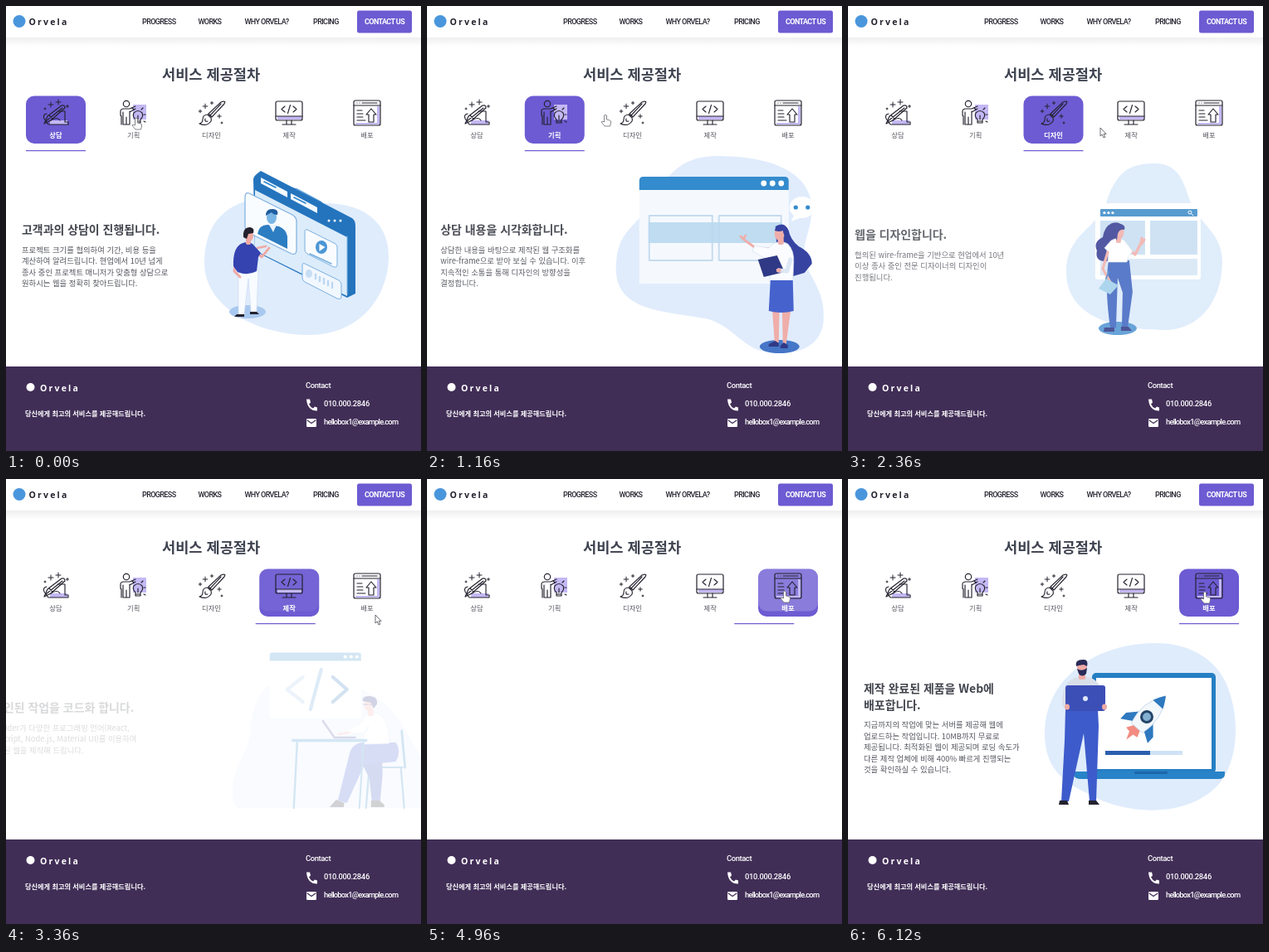
Write an HTML page that moves like this. It is 500 by 537 pixels and loops after 6.16 s.

```html
<!DOCTYPE html>
<html lang="ko">
<head>
<meta charset="utf-8">
<style>
html, body { margin: 0; width: 100%; height: 100%; overflow: hidden; background: #fff; }
svg { display: block; width: 100vw; height: 100vh; }
text { font-family: "Noto Sans CJK KR", "Noto Sans CJK", sans-serif; }
.nav { font: 500 9px Roboto, sans-serif; letter-spacing: -.6px; }
.brand { font: 600 10.5px "Noto Sans", sans-serif; letter-spacing: 2.2px; }
.info { font: 500 9.4px Roboto, sans-serif; fill: #fff; }
</style>
</head>
<body>
<svg id="stage" viewBox="0 0 500 537" preserveAspectRatio="none"></svg>
<script>
const LOOP = 6160, GAP = 93.75, PURPLE = '#6c5bd2', INK = '#24222e', LILAC = '#c4b8f4', GREY = '#55575f';
const SKIN = '#efaaa5', NAVY = '#26307f', ROYAL = '#3d5bcb', SKY = '#2b86cb', PALE = '#dfecfc';
const CLICKS = [0, 621, 1942, 3142, 4828];

// Shape helpers
const path = (d, fill, more = '') => `<path d="${d}" fill="${fill}" ${more}/>`;
const line = (d, color = INK, w = 1.15) =>
  `<path d="${d}" fill="none" stroke="${color}" stroke-width="${w}" stroke-linecap="round" stroke-linejoin="round"/>`;
const rect = (x, y, w, h, fill, r = 0, more = '') =>
  `<rect x="${x}" y="${y}" width="${w}" height="${h}" rx="${r}" fill="${fill}" ${more}/>`;
const oval = (x, y, rx, ry, fill, more = '') =>
  `<ellipse cx="${x}" cy="${y}" rx="${rx}" ry="${ry}" fill="${fill}" ${more}/>`;
const dots = (xs, y, r, fill) => xs.map(x => oval(x, y, r, r, fill)).join('');
const text = (x, y, s, size, fill, more = '') =>
  `<text x="${x}" y="${y}" font-size="${size}" fill="${fill}" ${more}>${s}</text>`;
const label = (x, y, s, cls, more = '') => `<text class="${cls}" x="${x}" y="${y}" ${more}>${s}</text>`;
const plus = (x, y, r) => line(`M${x - r} ${y}h${2 * r}M${x} ${y - r}v${2 * r}`, INK, 1);
const stroke = (color, w) => `stroke="${color}" stroke-width="${w}" stroke-linejoin="round"`;

const tabs = [
  { name: '상담', icon:
    rect(53, 138, 21, 5, LILAC) +
    line('M49 130q-5 1-3 6l5 7h24v-3h-4V127h-9M53 143h22') +
    path('M46 142l4-9 17-13q4-1 4 3L54 138z', 'none', stroke(INK, 1.2)) +
    line('M48 139l20-16M54 138q8-5 11 0M52 132l4 4') +
    plus(54, 119, 3) + plus(63, 116, 3) + plus(74, 121, 1.5) + plus(47, 124, 1) },
  { name: '기획', icon:
    rect(153, 119, 16, 18, LILAC) + oval(145, 118, 3.7, 3.7, 'none', stroke(INK, 1.15)) +
    line('M139 143v-10l-1-1v-5q0-3 4-3h7l7-3M141 128v15h4v-9M149 127v16h-4M149 128l7-4') +
    line('M156 137q-4-4-2-8 5-5 10 0 2 4-2 8v4h-6zM156 139h6M159 137v-5M152 123l2 2M165 123l-2 2M168 131h-2M166 139l2 1') },
  { name: '디자인', icon:
    line('M262 115q3 0 1 3l-15 16-4-4 15-14zM244 130l4 4M243 131q-6 0-6 6 0 4-4 5 9 4 14-3 1-4-1-5z') +
    line('M240 136q-1 4 3 3M246 132l13-14') +
    plus(240, 121, 2.8) + plus(248, 117, 1.7) + plus(234, 127, 1.8) + plus(257, 133, 2.2) + plus(260, 141, 1) },
  { name: '제작', icon:
    rect(327, 133, 29, 4, LILAC) + rect(325, 115, 32, 23, 'none', 2, stroke(INK, 1.2)) +
    line('M325 133h32M338 138v5M344 138v5M333 143h16M336 121l-4 3.5 4 3.5M346 121l4 3.5-4 3.5M342.5 119.5l-3 10') },
  { name: '배포', icon:
    rect(421, 141, 29, 2, LILAC) + rect(447, 121, 3, 20, LILAC) + rect(419, 114, 32, 30, 'none', 2, stroke(INK, 1.2)) +
    line('M419 120h32M423 117h.1M426 117h.1M429 117h18M423 126h6M423 130h7M423 134h7M423 138h10') +
    line('M440 124l6 7h-3v9h-6v-9h-3z') }
];

const consult = path('M239 310C239 265 262 240 300 233C340 227 352 233 385 238C432 238 461 262 461 302C461 352 425 397 365 397C300 397 239 362 239 310', PALE) +
  path('M342 232v-8q2-6 9-3l28 15q5 4 5 14l-6 5z', '#d5e8f8', stroke('#4f9ad6', 1.2)) +
  path('M298 209q0-4 9-10l110 57q4 3 4 9v82l-10 5-111-56z', '#2474bd') +
  path('M300 222l111 57v71l-111-55z', '#dcecfa') +
  path('M307 207l32 17v7l-32-17zM343 226l32 17v7l-32-17z', '#f4faff') +
  line('M311 212l14 7M347 231l14 7', SKY, 1.6) + dots([389, 396, 403], 259, 1.5, '#fff') +
  line('M411 278v70', '#84b8e4', 1) +
  path('M293 226l52 26q5 3 5 8v34q0 7-6 5l-51-25q-5-3-5-8v-35q0-7 5-5z', '#f9fcff', stroke('#7fb0e0', 1.2)) +
  path('M303 275q2-11 12-11l14 2q8 3 10 12v15z', '#2d7dc2') + oval(320, 255, 6, 8, '#79b6e4') +
  path('M313 253q0-9 9-8 7 1 5 7-5 0-7-3z', '#1f5d9f') + path('M317 264l5 9 4-9z', '#e9f5ff') +
  path('M363 270l34 17q2 1 2 4v21q0 4-4 3l-32-16q-3-2-3-5v-21q0-4 3-3z', '#f9fcff', stroke('#79afe0', 1)) +
  oval(380, 291, 7, 8, '#4b96d6') + path('M377.5 287l7 4-7 5z', '#fff') + line('M366 299l26 12', '#75aee0', 1.4) +
  path('M360 311l41 20q3 2 3 5v14q0 5-5 3l-39-20q-3-2-3-5v-14q0-5 3-3z', '#f1f7fe', stroke('#79afe0', 1)) +
  oval(365, 323, 4, 5, '#c6def4') + line('M373 324v5M378 327v5M383 329v6M388 332v5M393 334v6', '#bcd7f0', 2.4) +
  oval(291, 369, 22, 8, '#a9c8ef') +
  path('M280 318h24l-2 51h-7l-3-40-5 43h-7z', '#f8fbff', stroke('#c6d7ee', .6)) +
  path('M278 372h9v3h-12zM294 369h8l3 3h-11z', INK) +
  line('M301 296l7 7 9-11M303 292l10-2', SKIN, 2.8) + line('M278 302l-3 18 7 7', SKIN, 3) +
  path('M283 287q8-4 14 0l10 11-3 5-2 17q-11 6-23 1l-5-7q-1-21 9-27z', '#3443b0') + rect(289, 280, 6, 8, SKIN, 2) +
  oval(293, 277, 5, 7, SKIN) + path('M286 279q-1-12 8-12 6 1 4 7l-6 1-2 6z', INK);

const plan = path('M228 320C228 270 250 270 268 240C290 200 310 181 350 181C405 181 455 195 463 235C468 265 450 285 455 310C468 335 480 350 478 380C475 410 450 420 420 419C380 417 375 390 340 378C290 368 230 370 228 320', PALE) +
  rect(256, 214, 180, 121, '#f5f9fe') + path('M256 222v-11q0-5 5-5h170q5 0 5 5v11z', SKY) + dots([406, 416.5, 427], 214, 3.4, '#fff') +
  rect(268, 253, 76, 54, 'none', 0, stroke('#c5dbee', 2)) +
  rect(352, 253, 75, 54, 'none', 0, stroke('#c5dbee', 2)) +
  rect(267, 261, 161, 25, '#b6d9f0', 0, 'opacity=".9"') +
  oval(452, 243, 15, 13, '#fff') + path('M443 251l-4 9 13-5z', '#fff') + dots([444.5, 459], 243, 2.6, SKY) +
  oval(425, 411, 24, 8, '#3d70c5') +
  path('M416 363h9l-1 43h-5zM428 363h11l-6 45h-4z', SKIN) + path('M412 408l8-4 4 3v4h-12zM426 410l4-4 5 3v4h-9z', NAVY) +
  path('M420 266q11-7 16 5 2 11 12 19 16 8 16 21l-9 11-17 5-16-30z', '#2d3a9d') +
  line('M414 293l-18-1-15-11M381 281l-3-3M382 280l2-3', SKIN, 2.8) +
  path('M417 287q10-5 18 0 8 8 7 23l-1 23h-28l1-25-22-12 3-7 17 3z', '#fafcff', stroke('#cddbec', .6)) +
  rect(423, 279, 7, 9, SKIN, 2) + oval(425, 275, 6, 8, SKIN) + path('M419 271q2-8 11-7 7 6 5 18-5-4-6-11-4 2-10 0z', '#2d3a9d') +
  path('M414 331h27l1 37q-15 4-30 0z', ROYAL) + path('M399 306l23-5 9 20-25 6z', NAVY) + line('M438 306l-4 14-10-1', '#dce7f5', 5) + oval(424, 319, 3, 2.4, SKIN);

const design = path('M263 320C263 275 300 270 312 235C325 195 345 190 370 190C400 190 405 215 412 235C425 265 452 275 451 310C450 360 420 392 380 391C320 390 263 375 263 320', '#d9e9fb') +
  rect(298, 238, 127, 92, '#fff', 3) + rect(304, 245, 117, 9, '#3185c6', 1) + dots([309, 314, 319], 249.5, 1.6, '#fff') +
  oval(412, 249, 2, 2, 'none', 'stroke="#fff"') + line('M414 251l2 2', '#fff', 1) +
  rect(304, 259, 54, 41, '#c4dcf2') + rect(364, 259, 57, 41, '#c4dcf2') + rect(304, 305, 117, 20, '#d3e5f6') +
  oval(325, 389, 23, 8, '#478fd0') +
  path('M314 307h25l4 38-6 43h-7l1-42-6-18-2 60h-7q-7-48-2-81z', '#355ebd') + path('M309 388h12v5h-13zM329 387h9l4 5h-13z', NAVY) +
  path('M318 262q12-3 14 8l-9 17q0 18-11 21-15 1-12-13-5-10 7-16 2-13 11-17z', '#2c348d') +
  line('M337 292l9 8 7-14M353 287l1-7M354 287l3-5', SKIN, 3.2) +
  path('M317 283q8-5 16 0l10 13-5 6-2 7h-23q2-14-4-17z', '#fff', stroke('#d4deec', .6)) +
  line('M313 297l-6 20 10 18', SKIN, 3.2) + rect(323, 278, 6, 8, SKIN, 2) + oval(327, 273, 5.5, 8, SKIN) +
  path('M320 274q-2-13 9-11 6 2 4 7-6-1-8 5l-1 8z', '#2c348d') +
  path('M311 329l15 8-10 11-14-7z', '#9bcce9') + line('M311 329l3-8', '#4b85c7', 2);

const build = path('M225 375C228 340 243 335 247 302C250 265 262 242 300 240L365 250C405 258 425 285 438 312C452 336 462 342 469 362C480 385 476 397 468 397H234Q225 397 225 375', PALE) +
  rect(270, 211, 110, 78, '#fff', 2) + path('M270 219.5v-7q0-3 3-3h104q3 0 3 3v7z', '#2e86c3') + dots([361, 368, 375], 214.5, 2.1, '#fff') +
  line('M310 239l-19 15 19 15', '#a9c6e4', 4.2) + line('M332 230l-13 48', '#5d9fd9', 4.2) + line('M346 239l17 15-17 15', '#2872b9', 4.2) +
  line('M385 348h45M428 348l4 49M390 348l-4 49', '#2d85c4', 2.2) + line('M429 304l4 44', '#2d85c4', 2.8) +
  path('M377 335l28-4 1 26-3 32h-10l-3-28z', '#314fb8') + path('M392 388h10l6 5v3h-16z', INK) +
  path('M382 318h40q7 10 0 23l-38 4-21 46-11-3 14-56q3-13 16-14z', ROYAL) + path('M350 387l10 4-1 5h-17z', INK) +
  path('M385 285q11-6 20 1 8 7 9 33l-30 1-2-14-18 4-3-6 17-8z', '#fcfdff', stroke('#ccdaea', .7)) +
  line('M389 299l-6 10-20-3', '#dce7f5', 2) + line('M365 306l-12 2', SKIN, 2.6) + rect(388, 277, 7, 9, SKIN, 2) +
  oval(389, 272, 5.5, 7.5, SKIN) + path('M382 268q-1-7 9-6 10 1 8 10l-4 5-3-7z', NAVY) + line('M383 272h5M390 272h4', NAVY, 1) +
  line('M298 315.5h88', SKY, 3.6) + line('M303 318l-4 79', '#2d85c4', 2.4) + line('M383 318l-5 79', '#2d85c4', 2) +
  line('M334 292l14 20h25', '#484f9b', 2.4);

const deploy = path('M237 310C235 240 300 198 370 198C410 198 440 215 455 245C475 290 470 350 440 375C400 410 330 404 290 380C255 365 238 345 237 310', PALE) +
  rect(294, 234, 149, 121, '#267fc3', 5) + rect(299, 240, 139, 110, '#fff') +
  path('M272 353h182v3q0 6-8 6H281q-9 0-9-6z', '#2883c8') + rect(345, 353, 40, 3, '#1c67aa', 1) +
  rect(310, 328, 93, 5, '#cfe2f6') + rect(310, 328, 54, 5, '#2a5fae') +
  '<g transform="translate(360 287) rotate(42)">' +
  path('M-11 1l-11 12v10l13-8zM11 1l11 12v10L9 15z', '#2e79bf') + path('M-5 18h10l3 8-6 1-2 10-4-10-6-1z', '#f28c82') +
  path('M-9 18q-8-28 9-52 17 24 9 52z', '#f3f8fd', stroke('#c0d5e8', .8)) +
  path('M-8-20Q-4-29 0-34q4 5 8 14z', '#2e79bf') + oval(0, 0, 8, 8, '#254468') + oval(0, 0, 5, 5, '#83afd0') + '</g>' +
  path('M262 278h39l1 20-3 91h-8l-7-82-18 82h-9l4-74z', ROYAL) + path('M255 388h9l2 5h-12zM290 388h9l4 5h-13z', INK) +
  path('M273 240q10-5 20 0 15 7 16 33l-4 6h-40l-7-5q-1-28 15-34z', '#d9dfe9') +
  rect(278, 232, 8, 10, SKIN, 2) + oval(282, 227, 6, 9, SKIN) +
  path('M275 226q-2-8 8-8 7-1 5 8l-4-2-6 1z', '#292b58') + path('M276 229q6 4 12-1l-1 7q-5 5-9 0z', '#292b58') +
  rect(262, 249, 48, 31, '#3c4fb7', 3) + oval(286, 265, 3, 3, '#dfe6fb') + oval(264, 275, 3, 3.5, SKIN) + oval(309, 275, 3, 3.5, SKIN);

// dx cancels the inward drift in the drawn coordinates
const slides = [
  { art: consult, dx: 0, y: 275, head: ['고객과의 상담이 진행됩니다.'], body: ['프로젝트 크기를 협의하여 기간, 비용 등을', '계산하여 알려드립니다. 현업에서 10년 넘게', '종사 중인 프로젝트 매니저가 맞춤형 상담으로', '원하시는 웹을 정확히 찾아드립니다.'] },
  { art: plan, dx: -3, y: 275, head: ['상담 내용을 시각화합니다.'], body: ['상담한 내용을 바탕으로 제작된 웹 구조화를', 'wire-frame으로 받아 보실 수 있습니다. 이후', '지속적인 소통을 통해 디자인의 방향성을', '결정합니다.'] },
  { art: design, dx: -11, y: 281, head: ['웹을 디자인합니다.'], body: ['협의된 wire-frame을 기반으로 현업에서 10년', '이상 종사 중인 전문 디자이너의 디자인이', '진행됩니다.'] },
  { art: build, dx: 0, y: 281, head: ['디자인된 작업을 코드화 합니다.'], body: ['FE Builder가 다양한 프로그래밍 언어(React,', 'TypeScript, Node.js, Material UI)를 이용하여', '최적화된 웹을 제작해 드립니다.'] },
  { art: deploy, dx: 0, y: 257.5, head: ['제작 완료된 제품을 Web에', '배포합니다.'], body: ['지금까지의 작업에 맞는 서버를 제공해 웹에', '업로드하는 작업입니다. 10MB까지 무료로', '제공됩니다. 최적화된 웹이 제공되며 로딩 속도가', '다른 제작 업체에 비해 400% 빠르게 진행되는', '것을 확인하실 수 있습니다.'] }
];

const copy = s => {
  const top = s.y + (s.head.length - 1) * 20 + 22.5;
  return s.head.map((h, i) => text(19, s.y + i * 20, h, 13.95, '#42444d', 'font-weight="700"')).join('') +
    s.body.map((b, i) => text(19, top + i * 13.6, b, 9.35, GREY)).join('');
};

const slideView = (s, i) => `<g id="slide${i}"><g id="copy${i}">${copy(s)}</g>` +
  `<g id="art${i}"><g transform="translate(${s.dx})">${s.art}</g></g></g>`;

const tabView = (tab, i) => tab.icon +
  text(60 + GAP * i, 159, tab.name, 8.3, GREY, `id="tab${i}" text-anchor="middle"`);

const header = rect(0, 38, 500, 11, 'url(#shade)') + rect(0, 0, 500, 38, '#fff') +
  oval(16, 18.5, 7.5, 7.5, '#4a96dc') + label(27.5, 23, 'Orvela', 'brand', `fill="${INK}"`) +
  [[164, 'PROGRESS'], [231.5, 'WORKS'], [287.5, 'WHY ORVELA?'], [370, 'PRICING']]
    .map(([x, s]) => label(x, 22, s, 'nav', `fill="${INK}"`)).join('') +
  rect(423, 5.5, 66, 27, PURPLE, 2.5) + label(432, 22, 'CONTACT US', 'nav', 'fill="#fff" style="font-weight:700"');

const footer = rect(0, 435, 500, 102, '#412e57') + oval(29.5, 460, 5, 5, '#fff') +
  label(41, 464.5, 'Orvela', 'brand', 'fill="#fff"') +
  text(23, 494.5, '당신에게 최고의 서비스를 제공해드립니다.', 8.2, '#fff', 'font-weight="700"') +
  label(361, 461, 'Contact', 'info', 'letter-spacing="-.4"') +
  label(383, 482.5, '010.000.2846', 'info', 'letter-spacing="-.3"') +
  label(383, 505, 'hellobox1@example.com', 'info', 'letter-spacing="-.8"') +
  path('M362 475h4l1 4-2 2q2 4 5 5l2-2 3 1v4q-12 0-13-14z', '#fff', 'transform="translate(0 -.5)"') +
  rect(362, 498, 12, 10, '#fff', 1.2) + line('M363 500l5 3.5 5-3.5', '#412e57', 1.2);

const pointer = `<g id="cursor"><g id="hand">${path('M-1.5 1q1.500-2 3 0v5l4 1q1.500.5 1 3l-1 4H-1l-4-5q0-2 3.500 0z', '#fff', stroke('#6a6a72', .8))}</g>` +
  `<g id="arrow">${path('M0 0v10l2.300-2 1.700 4 1.800-.8-1.700-3.800h3z', '#fff', stroke('#4a4a52', .8))}</g></g>`;

const stage = document.getElementById('stage');
stage.innerHTML = '<defs><linearGradient id="shade" x2="0" y2="1"><stop stop-color="#efeff1"/><stop offset="1" stop-color="#fff"/></linearGradient></defs>' +
  header + text(188, 89, '서비스 제공절차', 17.6, '#3e4350', 'font-weight="700"') +
  rect(24, 108.5, 72, 57.5, PURPLE, 10, 'id="card"') + rect(24, 108.5, 72, 51, '#fff', 10, 'id="glow"') +
  tabs.map(tabView).join('') + rect(24, 174, 72, 1.2, PURPLE, 0, 'id="bar"') +
  slides.map(slideView).join('') + footer + pointer;

const $ = id => document.getElementById(id);
const set = (id, key, value) => $(id).setAttribute(key, value);
const clamp = v => Math.min(1, Math.max(0, v));

function bezier(x1, y1, x2, y2) {
  const at = (a, b, s) => 3 * a * s * (1 - s) ** 2 + 3 * b * s * s * (1 - s) + s ** 3;
  return x => {
    if (x <= 0 || x >= 1) return clamp(x);
    let lo = 0, hi = 1;
    for (let i = 0; i < 24; i++) {
      const mid = (lo + hi) / 2;
      if (at(x1, x2, mid) < x) lo = mid; else hi = mid;
    }
    return at(y1, y2, lo);
  };
}
const ease = bezier(.25, .1, .25, 1), standard = bezier(.4, 0, .2, 1);

// Time, x and y of the pointer tip
const route = [
  [0, 157, 135], [640, 156, 135], [1160, 215, 131], [1450, 248, 138], [1950, 248, 138],
  [2360, 304, 147], [2600, 342, 140], [3140, 342, 140], [3360, 445, 164],
  [3600, 433, 140], [3840, 431, 137], [4828, 431, 135], [LOOP, 430, 136]
];

function drawPointer(t) {
  const n = route.findIndex(k => k[0] > t);
  const [t0, x0, y0] = route[n - 1], [t1, x1, y1] = route[n];
  const u = (t - t0) / (t1 - t0), k = u * u * (3 - 2 * u);
  const x = x0 + (x1 - x0) * k, y = y0 + (y1 - y0) * k;
  const over = x >= 24 && (x - 24) % GAP < 72 && y < 163;
  set('cursor', 'transform', `translate(${x} ${y})`);
  set('hand', 'visibility', over ? 'visible' : 'hidden');
  set('arrow', 'visibility', over ? 'hidden' : 'visible');
}

function draw(now) {
  const t = now % LOOP;
  const active = CLICKS.filter(c => c <= t).length - 1;
  const since = active ? t - CLICKS[active] : LOOP;
  const x = 24 + GAP * active, shown = ease((since - 130) / 560), away = 60 * (1 - shown);
  set('card', 'x', x);
  set('glow', 'x', x);
  set('glow', 'opacity', .2 * clamp(since / 60) * clamp((250 - since) / 110));
  set('bar', 'x', x - GAP * (1 - standard(since / 300)));
  tabs.forEach((_, i) => {
    const on = i === active;
    set('tab' + i, 'fill', on ? '#fff' : GREY);
    set('tab' + i, 'font-weight', on ? 700 : 400);
    set('slide' + i, 'display', on ? 'inline' : 'none');
  });
  set('slide' + active, 'opacity', shown);
  set('copy' + active, 'transform', `translate(${-away})`);
  set('art' + active, 'transform', `translate(${away})`);
  drawPointer(t);
}

const start = performance.now();
function tick() {
  draw(performance.now() - start);
  requestAnimationFrame(tick);
}
tick();
</script>
</body>
</html>
```
